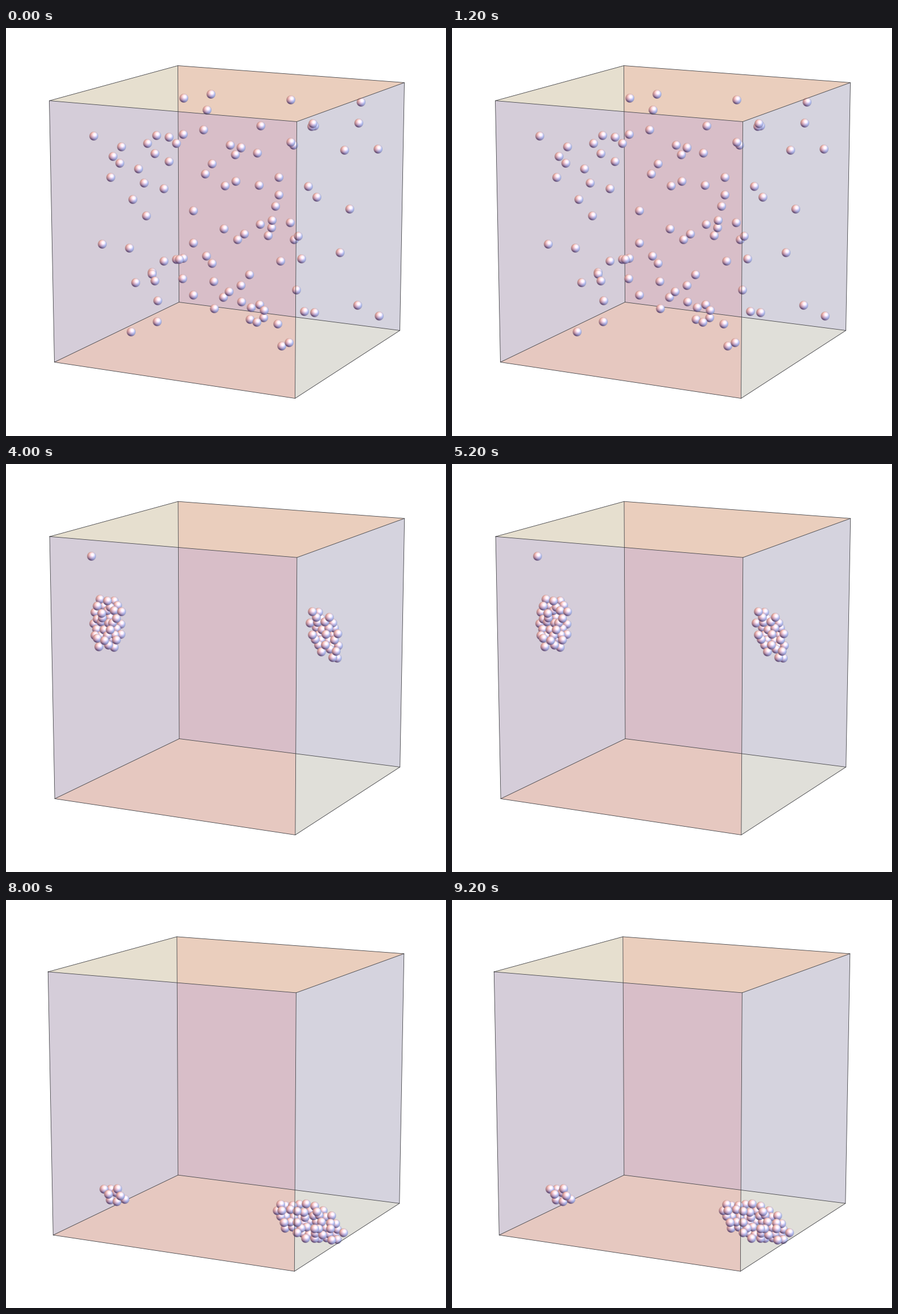
These frames come from a looping animation (777 px wide and 721 px high, 10 s). A matplotlib script:

```python
import random
from math import cos, hypot, radians, sin

import matplotlib.pyplot as plt
import numpy as np
from matplotlib.animation import ArtistAnimation

W, H, DPI = 777, 721, 64
PX = 72 / DPI
R = 8
EDGE = "#404044"
GAS = 100

# Cube corners as [top, bottom] x [back, right, left, front].
CUBE = np.array([
    [(303, 66), (703, 96), (76, 128), (513, 165)],
    [(305, 484), (695, 534), (85, 590), (510, 654)],
], float)

# Camera drift (pan, top, bottom) and clumps (x, y, rx, ry, tilt) per scene;
# a scene without clumps is a gas that fills the cube.
SCENES = [
    ((0, 0, 0), []),
    ((-1.2, -0.5, 1.2), []),
    ((0.6, -0.3, 1.0), [(151, 160, 1, 1, 0), (178, 281, 28, 45, 0),
                        (563, 300, 47, 22, 65)]),
    ((-1.2, -1, -0.2), [(134, 334, 18, 15, 30), (194, 313, 41, 37, 0),
                        (336, 232, 43, 26, 28), (391, 260, 12, 11, 0)]),
    ((-2.2, -1.6, 1.6), [(190, 521, 21, 15, 40), (535, 569, 64, 32, 18)]),
]

fig = plt.figure(figsize=(W / DPI, H / DPI), dpi=DPI, facecolor="white")
ax = fig.add_axes([0, 0, 1, 1])
ax.axis("off")


def make_ball(n=96):
    """Sphere lit warm from the upper left, cool from the right, dim in front."""
    g = (np.arange(n) + 0.5) / n * 2 - 1
    x, y = np.meshgrid(g, -g)
    rr = np.hypot(x, y)
    z = np.sqrt(np.clip(1 - rr**2, 0, 1))
    rgb = np.ones((n, n, 3)) * (0.28, 0.21, 0.34)
    lights = [
        ((-0.40, 0.70, 0.60), (0.53, 0.38, 0.20)),
        ((0.75, 0.15, 0.65), (0.32, 0.46, 0.50)),
        ((0.00, -0.30, 0.95), (0.14, 0.11, 0.15)),
    ]
    for (lx, ly, lz), color in lights:
        lit = np.clip(x * lx + y * ly + z * lz, 0, 1)
        rgb += lit[..., None] * color
    shine = np.clip(0.2 * x + 0.28 * y + 0.94 * z, 0, 1) ** 24
    rgb += 0.15 * shine[..., None]
    alpha = np.clip((1 - rr) * n / 6, 0, 1)
    return np.clip(np.dstack([rgb, alpha]), 0, 1)


BALL = make_ball()


def meet(a, b, c, d):
    """Crossing point of the lines ab and cd."""
    t = np.linalg.solve(np.column_stack([b - a, c - d]), c - a)[0]
    return a + t * (b - a)


def sway(pan, top, bottom):
    """The cube seen from a slightly moved camera."""
    cube = CUBE.copy()
    cube[..., 0] += pan * (1.1 - cube[..., 0] / 900)
    cube[0, :, 1] += top
    cube[1, :, 1] += bottom
    return cube


def draw_cube(cube):
    (tb, tr, tl, tf), (bb, br, bl, bf) = cube
    u = meet(tl, tf, tb, bb)
    v = meet(tf, bf, bb, br)
    faces = [
        ("#e6dfcf", (tl, tb, u)),
        ("#eacebd", (tb, tr, tf, u)),
        ("#d5cdd9", (tl, u, bb, bl)),
        ("#d8bec8", (u, tf, v, bb)),
        ("#e6c8c0", (bl, bb, v, bf)),
        ("#d5d3de", (tf, tr, br, v)),
        ("#e0dfd9", (v, br, bf)),
    ]
    out = [ax.fill(*zip(*pts), color=c, lw=0, zorder=0)[0] for c, pts in faces]
    back = [(tl, tb, tr), (tb, bb), (bl, bb, br)]
    front = [(tl, tf, tr, br, bf, bl, tl), (tf, bf)]
    for z, paths in ((1, back), (4, front)):
        for pts in paths:
            out += ax.plot(*zip(*pts), color=EDGE, lw=0.85 * PX, zorder=z,
                           solid_joinstyle="round")
    return out


def gas(cube, rng):
    """Balls spread evenly through the cube, far ones first."""
    spots = [[rng.uniform(0.04, 0.96) for _ in range(3)] for _ in range(GAS)]
    pts = []
    for a, b, h in sorted(spots, key=lambda s: s[0] + s[1]):
        weights = np.outer((1 - h, h), np.outer((1 - a, a), (1 - b, b)))
        pts.append((weights.reshape(2, 4, 1) * cube).sum(axis=(0, 1)))
    return pts


def clump(rng, cx, cy, rx, ry, tilt, step=11.5):
    """Loosely packed balls inside a tilted ellipse."""
    c, s = cos(radians(tilt)), sin(radians(tilt))
    pts = []
    for j in range(-8, 9):
        for i in range(-8, 9):
            dx, dy = (i + j % 2 / 2) * step, j * step * 0.87
            if hypot((dx * c + dy * s) / rx, (dy * c - dx * s) / ry) <= 1:
                pts.append((cx + dx + rng.gauss(0, 1.5),
                            cy + dy + rng.gauss(0, 1.5)))
    rng.shuffle(pts)
    return pts


def draw_balls(points):
    return [ax.imshow(BALL, extent=(x - R, x + R, y + R, y - R),
                      interpolation="hanning", aspect="auto", zorder=2)
            for x, y in points]


def draw_scene(seed, camera, clumps):
    rng = random.Random(seed)
    cube = sway(*camera)
    if clumps:
        pts = [p for spec in clumps for p in clump(rng, *spec)]
    else:
        pts = gas(cube, rng)
    return draw_cube(cube) + draw_balls(pts)


frames = [draw_scene(k, *scene) for k, scene in enumerate(SCENES, 11)]
ax.set(xlim=(-0.5, W - 0.5), ylim=(H - 0.5, -0.5))

anim = ArtistAnimation(fig, frames, interval=2000, repeat=True, repeat_delay=0)
plt.show()
```
